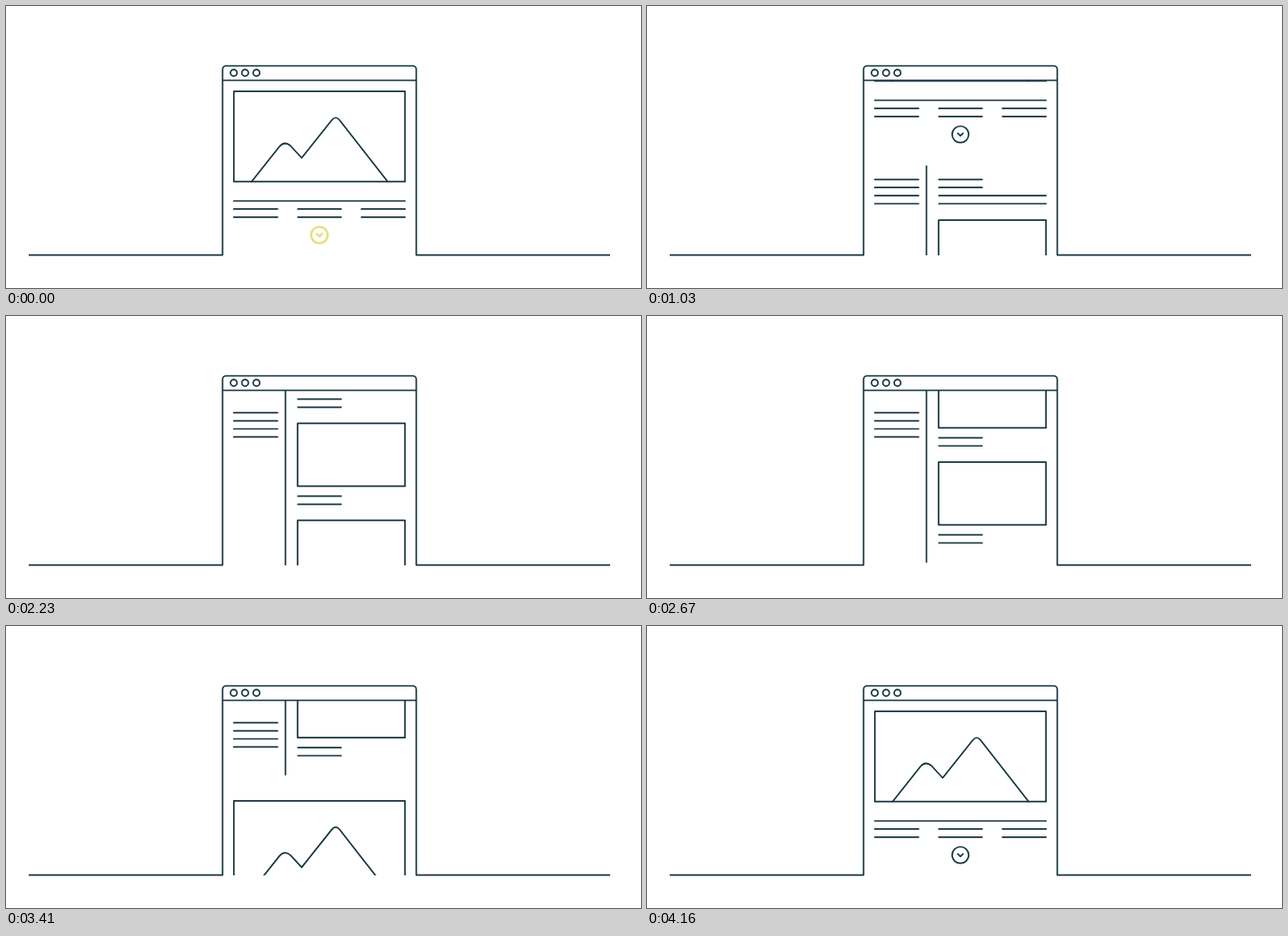
Write an HTML page that moves like this. It is 699 by 311 pixels and loops after 4.61 s.

```html
<!DOCTYPE html>
<html lang="en">
<head>
<meta charset="utf-8">
<title>Scrolling page</title>
<style>
  html, body { margin: 0; width: 100%; height: 100%; overflow: hidden; background: #fff; }
  svg { display: block; }
  svg * { fill: none; }
  .ink { stroke: #14343c; stroke-width: 1.7; stroke-linecap: round; stroke-linejoin: round; }
  .lit { stroke: #e8df80; stroke-width: 2.6; }
</style>
</head>
<body>
<svg width="699" height="311" viewBox="0 0 699 311">
  <defs>
    <clipPath id="view"><rect x="240" y="82" width="210" height="193"/></clipPath>
    <g id="home">
      <rect x="250.8" y="94.2" width="188.4" height="99.5"/>
      <path d="M270.5 193.5L301 155Q306.5 148.5 313 154L325.5 167.5L358.5 126Q363 120.5 367.3 126L420 193.5"/>
      <path d="M250.8 215H439.2M250.8 223.9h48.1m22.4 0h47.6m22.4 0h47.9M250.8 232.8h48.1m22.4 0h47.6m22.4 0h47.9"/>
    </g>
    <g id="arrow">
      <circle cx="345" cy="252.6" r="9.1"/>
      <path d="M342.1 251.3l2.9 2.9 2.9-2.9"/>
    </g>
  </defs>
  <g class="ink">
    <g clip-path="url(#view)">
      <g id="page">
        <use href="#home"/>
        <use href="#arrow" id="button"/>
        <path id="article"/>
        <g transform="translate(0 606)">
          <use href="#home"/>
          <use href="#arrow"/>
        </g>
      </g>
      <path id="sidebar" d="M250.8 0h48.1m-48.1 8.9h48.1m-48.1 8.9h48.1m-48.1 8.9h48.1"/>
    </g>
    <path stroke-linecap="butt" style="stroke-linecap:butt"
      d="M25 274.6H238.4V70a4 4 0 0 1 4-4H447.6a4 4 0 0 1 4 4V274.6H665M238.4 82H451.6"/>
    <circle cx="250.7" cy="73.7" r="3.6"/>
    <circle cx="263.2" cy="73.7" r="3.6"/>
    <circle cx="275.7" cy="73.7" r="3.6"/>
  </g>
</svg>
<script>
  const LOOP = 4610, END = 606, SPEED = 21.45;
  const SHORT_STEPS = [2, 6, 15, 19];
  const SIDE_TOP = 302.3, SIDE_STICK = 106.7, SIDE_HEIGHT = 26.7;
  const BOX_TOP = 347.2, BOX_PITCH = 107, LAST_LINE = 650.4;
  const $ = id => document.getElementById(id);

  const line = (y, width) => `M321.3 ${y}h${width}`;
  let d = 'M307.6 287.5V671.3' + line(302.3, 47.6) + line(311.2, 47.6)
    + line(320.1, 117.9) + line(329, 117.9);
  for (let i = 0; i < 3; i++) {
    const y = BOX_TOP + i * BOX_PITCH;
    d += `M321 ${y}h118.2v69.3h-118.2z` + line(y + 80.3, 47.6) + line(y + 89.2, 47.6);
  }
  $('article').setAttribute('d', d);

  // Each step lasts 150 ms, a few last 140 ms; the final one holds.
  const starts = [0];
  for (let k = 0; k < 28; k++) starts.push(starts[k] + (SHORT_STEPS.includes(k) ? 140 : 150));

  // Cubic between two [step, offset, speed] knots
  function curve(k, [k0, y0, v0], [k1, y1, v1]) {
    const n = k1 - k0, t = (k - k0) / n, u = 1 - t;
    return u * u * ((1 + 2 * t) * y0 + t * n * v0) + t * t * ((1 + 2 * u) * y1 - u * n * v1);
  }

  const rest = [2, 0, 0], swift = [7, 111, 36], steady = [11, 250, SPEED];
  function scrollAt(k) {
    if (k <= rest[0]) return 0;
    if (k < swift[0]) return curve(k, rest, swift);
    if (k < steady[0]) return curve(k, swift, steady);
    return Math.min(END, steady[1] + (k - steady[0]) * SPEED);
  }

  function draw(time) {
    const k = starts.findLastIndex(s => s <= time % LOOP);
    const offset = scrollAt(k);
    // The sidebar sticks, then leaves with the end of the article.
    const side = Math.min(Math.max(SIDE_TOP - offset, SIDE_STICK), LAST_LINE - SIDE_HEIGHT - offset);
    $('page').setAttribute('transform', `translate(0 ${-offset})`);
    $('sidebar').setAttribute('transform', `translate(0 ${side})`);
    $('button').setAttribute('class', k === 0 ? 'lit' : '');
  }

  const begin = performance.now();
  function tick() {
    draw(performance.now() - begin);
    requestAnimationFrame(tick);
  }
  tick();
</script>
</body>
</html>
```
